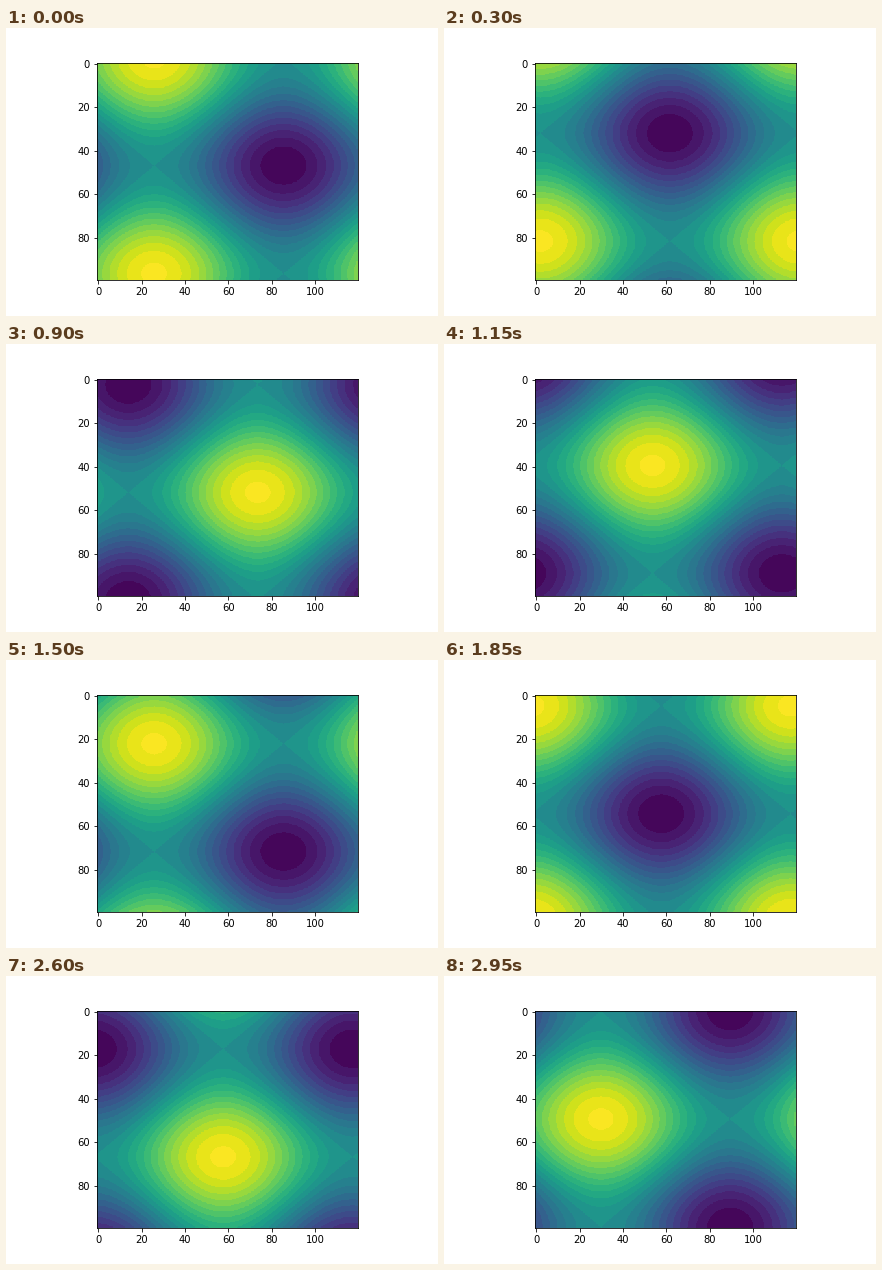
Recreate the animation shown at these times as a matplotlib script. Size 432x288 px, loop 3 s.

```python
import numpy as np
import matplotlib.pyplot as plt
from matplotlib.animation import FuncAnimation
from matplotlib.colors import BoundaryNorm, ListedColormap

FRAMES = 60
INTERVAL = 50

x = np.linspace(0, 2 * np.pi, 120)
y = np.linspace(0, 2 * np.pi, 100).reshape(-1, 1)

# Flat colour bands, meeting at the saddle level 0.5
edges = np.concatenate([[0], np.linspace(0.038, 0.5, 12),
                        np.linspace(0.5, 0.988, 13)[1:], [1]])
centers = (edges[:-1] + edges[1:]) / 2
bands = ListedColormap(plt.get_cmap("viridis")(centers))
norm = BoundaryNorm(edges, bands.N)


def field(i):
    """Drifting wave at step i, scaled to 0..1."""
    step = i + 1
    z = np.sin(x + step * np.pi / 15) + np.cos(y + step * np.pi / 20)
    return (z - z.min()) / (z.max() - z.min())


plt.rcParams.update({"font.family": "DejaVu Sans", "font.size": 10})
fig, ax = plt.subplots(figsize=(6, 4), dpi=72, facecolor="white")
fig.subplots_adjust(left=0.125, right=0.9, bottom=0.125, top=0.88)
image = ax.imshow(field(0), cmap=bands, norm=norm)


def update(i):
    image.set_data(field(i))
    return (image,)


anim = FuncAnimation(fig, update, frames=FRAMES, interval=INTERVAL,
                     repeat=True, repeat_delay=0, blit=False)
plt.show()
```
